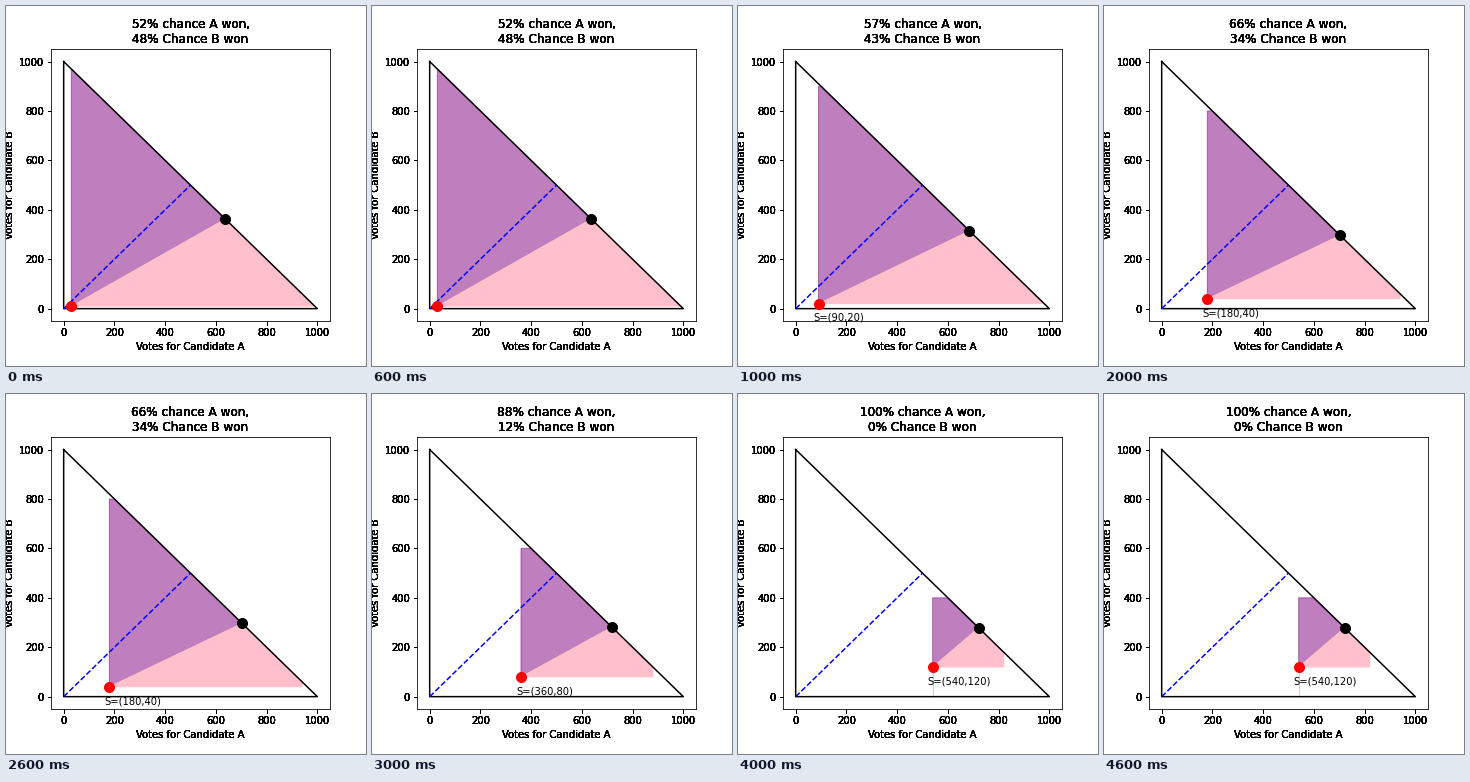
These frames come from a looping animation (360 px wide and 360 px high, 5000 ms). A matplotlib script:

```python
import matplotlib.pyplot as plt
from matplotlib.animation import FuncAnimation

TOTAL = 1000
# votes counted for A and B, upper bounds for A and B, expected A, chance A wins
STEPS = [
    (30, 10, 987, 967, 637, 52),
    (90, 20, 970, 900, 685, 57),
    (180, 40, 940, 800, 703, 66),
    (360, 80, 880, 600, 718, 88),
    (540, 120, 820, 400, 721, 100),
]

plt.rcParams["font.family"] = "DejaVu Sans"
fig = plt.figure(figsize=(5, 5), dpi=72, facecolor="white")
ax = fig.add_axes([0.125, 0.125, 0.775, 0.755])


def harden(artist, passes=8):
    """Draw an artist repeatedly so its soft edges turn solid."""
    draw = artist.draw

    def draw_all(renderer):
        for _ in range(passes):
            draw(renderer)

    artist.draw = draw_all


def region(color, **style):
    return ax.fill([0, 0, 0], [0, 0, 0], color=color, linewidth=1, **style)[0]


ax.set(xlim=(-50, 1050), ylim=(-50, 1050),
       xticks=range(0, 1001, 200), yticks=range(0, 1001, 200))
title = ax.set_title("")
labels = [ax.set_xlabel("Votes for Candidate A"),
          ax.set_ylabel("Votes for Candidate B")]

b_region = region("purple", alpha=0.5)
a_region = region("pink")
drop, = ax.plot([], [], color="pink", lw=1)
ax.plot([0, 0, TOTAL, 0], [TOTAL, 0, 0, TOTAL], color="black", lw=1.5)
ax.plot([0, TOTAL / 2], [0, TOTAL / 2], "b--", lw=1.5)
expected, = ax.plot([], [], "o", color="black", ms=10)
counted, = ax.plot([], [], "o", color="red", ms=10)
note = ax.text(0, 0, "", fontsize=10)

for artist in [title, *labels, *ax.get_xticklabels(), *ax.get_yticklabels(),
               *ax.get_xticklines(), *ax.get_yticklines()]:
    harden(artist)


def update(i):
    a, b, a_max, b_max, mean, chance = STEPS[i]
    dot = (mean, TOTAL - mean)
    b_region.set_xy([(a, b), (a, b_max), (TOTAL - b_max, b_max), dot])
    a_region.set_xy([(a, b), (a_max, b), (a_max, TOTAL - a_max), dot])
    expected.set_data([dot[0]], [dot[1]])
    counted.set_data([a], [b])
    drop.set_data([a, a], [0, b])
    drop.set_visible(chance == 100)
    note.set_position((a - 20, b - 70))
    note.set_text(f"S=({a},{b})" if i else "")
    title.set_text(f"{chance}% chance A won,\n{100 - chance}% Chance B won")
    return a_region, b_region, drop, expected, counted, note, title


anim = FuncAnimation(fig, update, frames=len(STEPS), interval=1000,
                     repeat=True, repeat_delay=0, blit=False)
plt.show()
```
